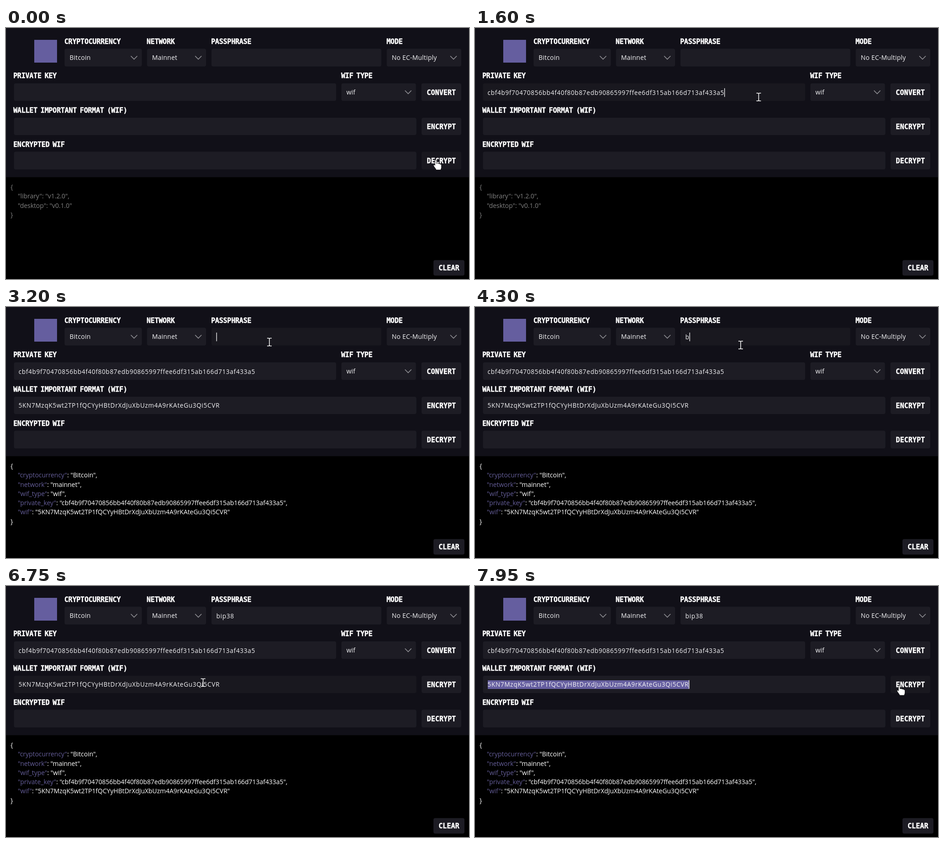
Write an HTML page that moves like this. It is 1016 by 551 pixels and loops after 8 s.

```html
<!DOCTYPE html>
<html lang="en">
<head>
<meta charset="utf-8">
<title>Key converter</title>
<style>
  html, body { margin: 0; width: 100%; height: 100%; overflow: hidden; background: #111018; }
  svg { display: block; width: 100vw; height: 100vh; }
  text { white-space: pre; fill: #fff; }
  .label {
    font: bold 15px "DejaVu Sans Mono", monospace; letter-spacing: -.2px; word-spacing: -2px;
    stroke: #fff; stroke-width: .45;
  }
  .button { text-anchor: middle; letter-spacing: .1px; }
  .choice, .output { font: 14px "Open Sans", "Noto Sans", sans-serif; letter-spacing: -.05px; }
  .choice { letter-spacing: .2px; }
  .choice, .input { fill: #f4f4f6; }
  .input { font: 13.6px "Open Sans", "Noto Sans", sans-serif; letter-spacing: .69px; font-variant-ligatures: none; }
  .idle text { fill: #808080; }
  .key { fill: #645d98; }
  .field { fill: #1d1c24; }
  .field.hover { fill: #19181f; }
  .chevron { fill: none; stroke: #8e8e93; stroke-width: 1.7; }
  .accent { fill: #655e9f; }
  .hand, .arrow { fill: #fff; stroke: #000; stroke-width: .8; }
  .beam { fill: none; stroke: #fff; stroke-width: 1.5; }
</style>
</head>
<body>
<svg viewBox="0 0 1016 551">
  <rect width="1016" height="551" fill="#111018"/>
  <rect y="327.5" width="1016" height="223.5" fill="#000"/>
  <rect class="accent" x="62" y="26" width="50" height="50"/>
  <g id="form"></g>
  <g id="idle" class="idle"></g>
  <g id="result"></g>
  <rect id="selection" class="accent" x="28" y="207" height="19"/>
  <g id="inputs"></g>
  <rect id="caret" width="1.3" height="19" fill="#fff"/>
  <g id="pointer">
    <path class="hand" d="M-1.8 1.5a1.8 1.8 0 0 1 3.6 0V8l1-.6c1-.5 2 0 2.4.8 .8-.6 2-.3 2.5.6 1-.6 2.2 0 2.6 1 1.2-.4 2.2.4 2.2 2V16c0 3-1.5 4-1.5 6H1c-1-3-5-7-5.8-9.5-.5-1.6 1.5-2.4 2.5-1.2l.5.7z"/>
    <path class="beam" d="M-5-8.5h3Q0-8.5 0-6.5Q0-8.5 2-8.5H5M0-7V7M-5 8.5h3Q0 8.5 0 6.5Q0 8.5 2 8.5H5"/>
    <path class="arrow" d="M0 0V16.5L3.9 12.9 6.6 19 9 18 6.4 12H11.6Z"/>
  </g>
</svg>
<script>
const LOOP = 8000;
const PRIVATE_KEY = "cbf4b9f70470856bb4f40f80b87edb90865997ffee6df315ab166d713af433a5";
const WIF = "5KN7MzqK5wt2TP1fQCYyHBtDrXdJuXbUzm4A9rKAteGu3Qi5CVR";
const $ = id => document.getElementById(id);

function add(parent, tag, attrs, content = "") {
  const node = document.createElementNS("http://www.w3.org/2000/svg", tag);
  for (const name in attrs) node.setAttribute(name, attrs[name]);
  node.textContent = content;
  return parent.appendChild(node);
}

const label = (x, y, content) => add($("form"), "text", { class: "label", x, y }, content);
label(128, 34.5, "CRYPTOCURRENCY");
label(308.5, 34.5, "NETWORK");
label(450, 34.5, "PASSPHRASE");
label(835, 34.5, "MODE");
label(16, 110, "PRIVATE KEY");
label(735.5, 110, "WIF TYPE");
label(16, 186, "WALLET IMPORTANT FORMAT (WIF)");
label(16, 260.5, "ENCRYPTED WIF");

const fields = [];
function field(kind, left, top, right, bottom, content) {
  const box = { x: left, y: top, width: right - left, height: bottom - top, rx: 4 };
  const node = add($("form"), "rect", { class: "field", ...box });
  const middle = (top + bottom) / 2;
  if (kind === "choice") {
    add($("form"), "text", { class: "choice", x: left + 11, y: middle + 5.3 }, content);
    add($("form"), "path", { class: "chevron", d: `M${right - 24} ${middle - 3.5}l7 7 7-7` });
  } else if (kind === "button") {
    add($("form"), "text", { class: "label button", x: (left + right) / 2, y: middle + 5.8 }, content);
  }
  fields.push({ kind, left, top, right, bottom, node });
}
field("choice", 128.5, 45.5, 298, 84.5, "Bitcoin");
field("choice", 309.5, 45.5, 439, 84.5, "Mainnet");
field("input", 451, 45.5, 823.5, 84.5);
field("choice", 835.5, 45.5, 999, 84.5, "No EC-Multiply");
field("input", 17.5, 121.5, 724.5, 160);
field("choice", 736, 121.5, 899.5, 160, "wif");
field("button", 911.5, 121.5, 999, 160, "CONVERT");
field("input", 17.5, 197, 900.5, 235);
field("button", 912, 197, 999, 235, "ENCRYPT");
field("input", 17.5, 271.5, 900.5, 310.5);
field("button", 912, 271.5, 999, 310.5, "DECRYPT");
field("button", 938, 509.5, 1006, 543.5, "CLEAR");

function printJson(group, entries) {
  const line = (row, x, content) =>
    add(group, "text", { class: "output", x, y: 354 + row * 20.27 }, content);
  line(0, 10, "{");
  entries.forEach(([key, value], i) => {
    const node = line(i + 1, 26, "");
    add(node, "tspan", group.id === "idle" ? {} : { class: "key" }, `"${key}"`);
    add(node, "tspan", {}, `: "${value}"${i < entries.length - 1 ? "," : ""}`);
  });
  line(entries.length + 1, 10, "}");
}
printJson($("idle"), [["library", "v1.2.0"], ["desktop", "v0.1.0"]]);
printJson($("result"), [
  ["cryptocurrency", "Bitcoin"], ["network", "mainnet"], ["wif_type", "wif"],
  ["private_key", PRIVATE_KEY], ["wif", WIF]
]);

const input = (x, y) => add($("inputs"), "text", { class: "input", x, y });
const privateKey = input(27.5, 146.5);
const passphrase = input(461.5, 70.5);
const wif = input(27.5, 221);

// Pointer moves: start, end, target x, target y
const moves = [
  [0, 0, 943, 289.5],
  [20, 650, 622, 151.5],
  [1450, 1600, 622.5, 151.5],
  [1720, 2250, 926, 140.5],
  [2810, 3180, 578, 77],
  [3510, 3750, 583, 83.5],
  [6010, 6750, 432.5, 212],
  [6970, 7800, 933, 216.5],
  [7810, 7950, 931, 218]
];
const keystrokes = [4250, 4450, 4600, 4750, 4900];

// Visible caret spans: start, end, input
const carets = [
  [800, 1750, privateKey], [3200, 3740, passphrase], [4250, 5500, passphrase],
  [6050, 6600, passphrase], [7000, LOOP, wif]
];

function pointerAt(t) {
  let [, , x, y] = moves[0];
  for (const [start, end, toX, toY] of moves.slice(1)) {
    if (t <= start) break;
    const p = Math.min(1, (t - start) / (end - start));
    const eased = p * p * (3 - 2 * p);
    x += (toX - x) * eased;
    y += (toY - y) * eased;
  }
  return [x, y];
}

const show = (node, visible) => node.style.display = visible ? "" : "none";
function setText(node, content) {
  if (node.textContent !== content) node.textContent = content;
}

function draw(now) {
  const t = now % LOOP;
  const converted = t >= 2400;
  setText(privateKey, t >= 1150 ? PRIVATE_KEY : "");
  setText(passphrase, "bip38".slice(0, keystrokes.filter(k => t >= k).length));
  setText(wif, converted ? WIF : "");
  show($("idle"), !converted);
  show($("result"), converted);

  const selected = t >= 7000;
  show($("selection"), selected);
  if (selected) $("selection").setAttribute("width", wif.getComputedTextLength());

  const active = carets.find(([start, end]) => t >= start && t < end);
  show($("caret"), active);
  if (active) {
    const node = active[2];
    const length = node.textContent ? node.getComputedTextLength() : 0;
    $("caret").setAttribute("x", +node.getAttribute("x") + length);
    $("caret").setAttribute("y", node.getAttribute("y") - 14.3);
  }

  const [x, y] = pointerAt(t);
  const over = fields.find(f => x >= f.left && x <= f.right && y >= f.top && y <= f.bottom);
  for (const f of fields) f.node.classList.toggle("hover", f === over);
  $("pointer").setAttribute("transform", `translate(${x} ${y})`);
  const [hand, beam, arrow] = $("pointer").children;
  show(hand, over && over.kind !== "input");
  show(beam, over && over.kind === "input");
  show(arrow, !over);
}

const begin = performance.now();
function tick() {
  draw(performance.now() - begin);
  requestAnimationFrame(tick);
}
tick();
</script>
</body>
</html>
```
